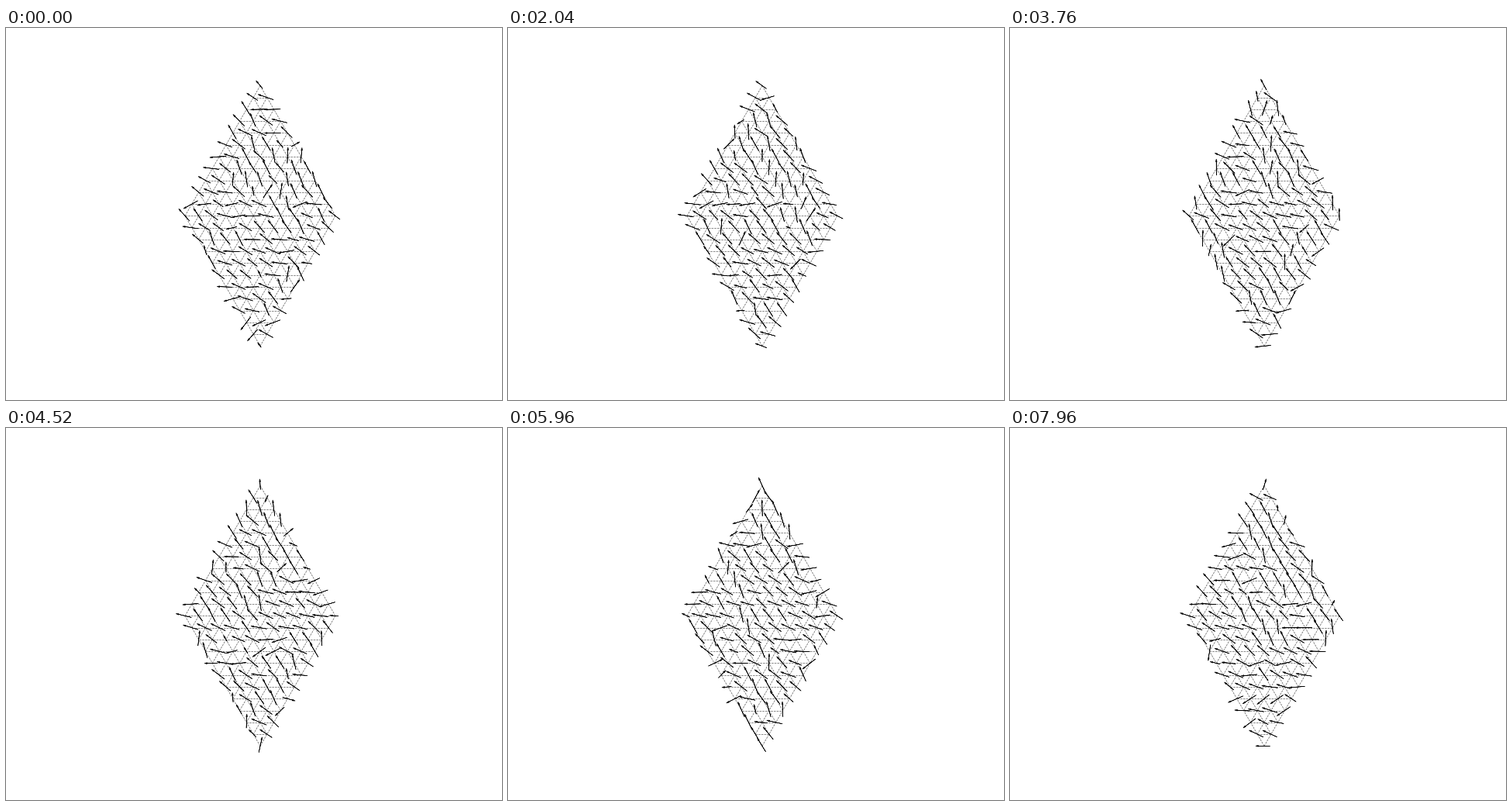
A matplotlib script that plays this animation: 640 by 480 pixels, repeating every 8 s.

```python
import matplotlib.pyplot as plt
import numpy as np
from matplotlib.animation import FuncAnimation
from matplotlib.collections import PolyCollection

N = 12                  # sites per side of the rhombus
FRAMES = 200
BETA = 0.95             # coupling over temperature
SCALE = 336 / ((2 * N - 2) * np.sqrt(3) / 2)    # pixels per bond
CENTER = 328, 242.4
HEAD_W, HEAD_L, SHAFT_W = 0.1, 0.2, 0.001
NEIGHBORS = [(1, 0), (-1, 0), (0, 1), (0, -1), (1, -1), (-1, 1)]


def site(i, j):
    return (i - j) / 2, (N - 1 - i - j) * np.sqrt(3) / 2


def unit(v):
    return v / np.linalg.norm(v, axis=-1, keepdims=True)


def simulate():
    """Metropolis sweeps of classical 3D spins with open edges."""
    rng = np.random.default_rng(12)
    angle = np.radians(141)
    easy = np.array([np.cos(angle), np.sin(angle), 0])
    field = 1.3 * easy
    spins = np.zeros((N + 2, N + 2, 3))
    spins[1:-1, 1:-1] = easy
    warmup, tries = 60, 110
    states = []
    for step in range(warmup + FRAMES):
        picks = rng.integers(1, N + 1, (tries, 2))
        trials = unit(rng.normal(size=(tries, 3)))
        chances = np.log(rng.random(tries))
        for (i, j), new, chance in zip(picks, trials, chances):
            local = field + BETA * sum(spins[i + a, j + b] for a, b in NEIGHBORS)
            if chance < (new - spins[i, j]) @ local:
                spins[i, j] = new
        if step >= warmup:
            states.append(spins[1:-1, 1:-1, :2].reshape(-1, 2).copy())
    return states


def arrows(spins):
    """Outlines of arrows centred on the sites, heads added past the shaft."""
    size = np.linalg.norm(spins, axis=1)
    along = spins / size[:, None]
    across = np.stack([-along[:, 1], along[:, 0]], axis=1)
    half = size / 2
    w, h = SHAFT_W / 2, HEAD_W / 2
    outline = [(-half, -w), (half, -w), (half, -h), (half + HEAD_L, 0),
               (half, h), (half, w), (-half, w)]
    points = [sites + np.reshape(u, (-1, 1)) * along + v * across
              for u, v in outline]
    return np.stack(points, axis=1)


def bond_line(start, end):
    (x0, y0), (x1, y1) = site(*start), site(*end)
    ax.plot([x0, x1], [y0, y1], "--", color="0.35", lw=0.5, zorder=1)


sites = np.array([site(i, j) for i in range(N) for j in range(N)])
states = simulate()

fig = plt.figure(figsize=(6.4, 4.8), dpi=100, facecolor="white")
ax = fig.add_axes([0, 0, 1, 1])
ax.axis("off")

last = N - 1
for k in range(N):
    bond_line((k, 0), (k, last))
    bond_line((0, k), (last, k))
for k in range(1, 2 * last):
    low, high = max(0, k - last), min(k, last)
    bond_line((low, k - low), (high, k - high))

ax.set_xlim(-CENTER[0] / SCALE, (640 - CENTER[0]) / SCALE)
ax.set_ylim((CENTER[1] - 480) / SCALE, CENTER[1] / SCALE)

quills = PolyCollection(arrows(states[0]), facecolor="k", edgecolor="k",
                        linewidth=0.45, joinstyle="miter", snap=False,
                        zorder=2)
ax.add_collection(quills, autolim=False)


def update(n):
    quills.set_verts(arrows(states[n]))
    return quills,


anim = FuncAnimation(fig, update, frames=FRAMES, interval=40,
                     repeat=True, repeat_delay=0)
plt.show()
```
